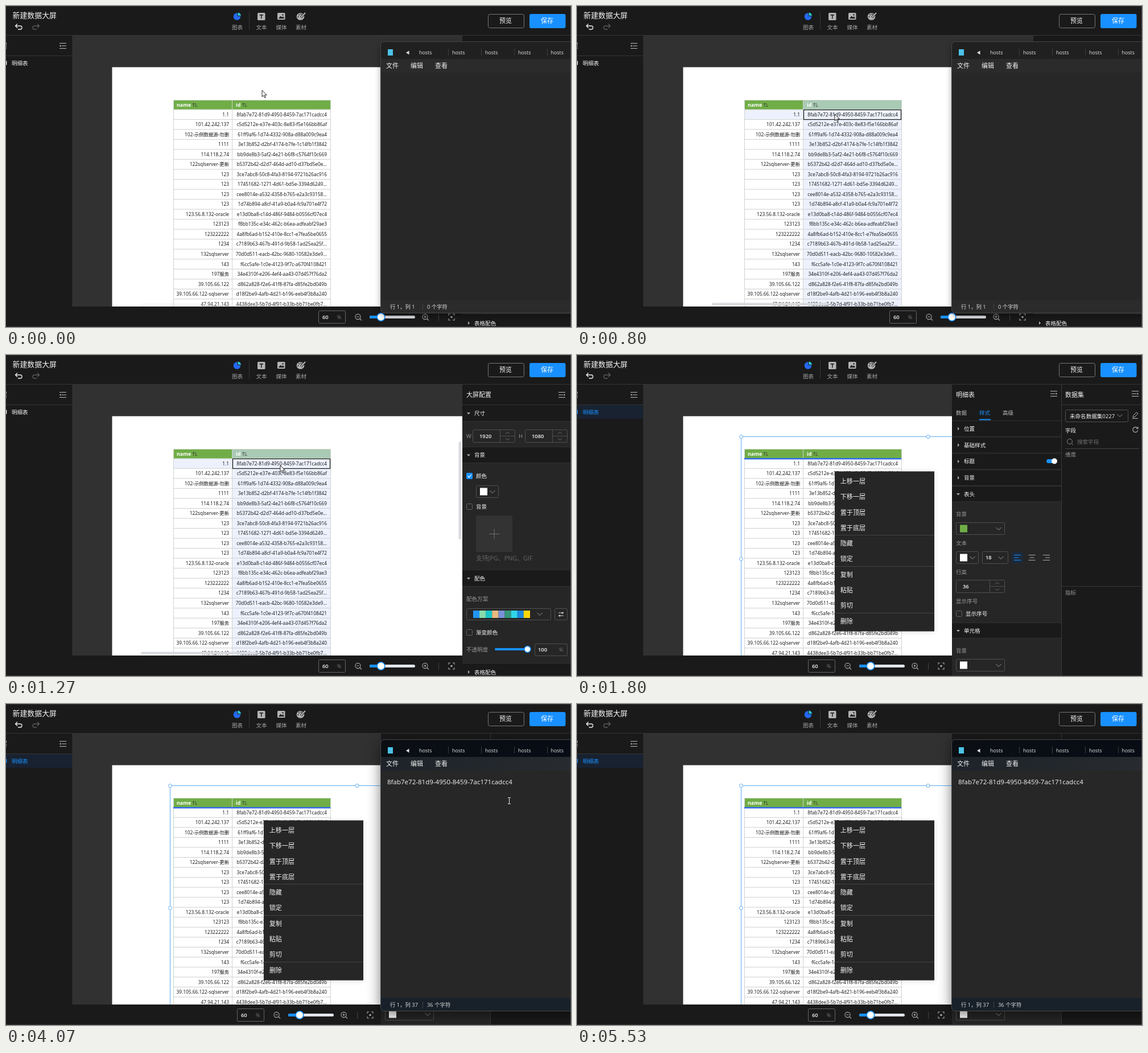
An HTML page for the animation above (5590 ms loop, 993x564 px).

```html
<!DOCTYPE html>
<html lang="zh-CN">
<head>
<meta charset="utf-8">
<title>数据大屏</title>
<style>
html, body { margin: 0; width: 100%; height: 100%; overflow: hidden; background: #1a1a1a; }
svg { display: block; width: 993px; height: 564px; }
text { font-family: 'Open Sans', 'Noto Sans CJK SC', 'Noto Sans CJK', sans-serif; white-space: pre; }
</style>
</head>
<body>
<svg id="stage" viewBox="0 0 993 564"></svg>
<script>
const LOOP = 5590, TICK = 200 / 3;
const BLUE = '#1890ff', PANEL = '#1a1a1a', BODY = '#262626', LINE = '#353535';
const WHITE = '#f5f5f5', GRAY = '#999', EDGE = '#505050', GREEN = '#70ad47';
const ID = '8fab7e72-81d9-4950-8459-7ac171cadcc4';
const MEDIUM = 'font-weight="500"', SEMI = 'font-weight="600"';

const rect = (x, y, w, h, fill, extra = '') =>
  `<rect x="${x}" y="${y}" width="${w}" height="${h}" fill="${fill}" ${extra}/>`;
const box = (x, y, w, h, stroke = EDGE, r = 2, fill = 'none') =>
  rect(x + .5, y + .5, w - 1, h - 1, fill, `stroke="${stroke}" rx="${r}"`);
const text = (x, y, str, size = 9.56, fill = WHITE, extra = MEDIUM) =>
  `<text x="${x}" y="${y + size * .37}" font-size="${size}" fill="${fill}" ${extra}>${str}</text>`;
const path = (d, stroke = '#bbb', width = 1, fill = 'none') =>
  `<path d="${d}" stroke="${stroke}" stroke-width="${width}" fill="${fill}"/>`;
const circle = (x, y, r, fill, extra = '') =>
  `<circle cx="${x}" cy="${y}" r="${r}" fill="${fill}" ${extra}/>`;
const group = (id, body, extra = '') => `<g id="${id}" ${extra}>${body}</g>`;
const hline = (x, y, w, fill = LINE) => rect(x, y, w, 1, fill);

const chevron = (x, y) => path(`M${x - 4.5} ${y - 2}l4.5 4.5 4.5-4.5`, '#999');
const foldIcon = (x, y, side) =>
  path(`M${x - 6} ${y - 4.5}h12M${side < 0 ? x - 2 : x - 6} ${y}h8M${x - 6} ${y + 4.5}h12`, '#bbb', 1.2) +
  path(`M${x + side * 6} ${y}l${-side * 2.5}-2v4z`, 'none', 0, '#bbb');
const section = (x, y, w, h, label, open) => {
  const c = y + h / 2, tx = x + 11;
  return rect(x, y, w, h, PANEL) + hline(x, y, w, '#303030') + hline(x, y + h - 1, w, '#303030') +
    path(open ? `M${tx - 3} ${c - 1}h6l-3 3.5z` : `M${tx - 1} ${c - 3}v6l3-3z`, 'none', 0, '#aaa') +
    text(x + 21, c, label);
};
const checkbox = (x, y, on) => on
  ? rect(x, y, 11, 11, BLUE, 'rx="1.5"') + path(`M${x + 2.5} ${y + 5.5}l2.3 2.5 4-5`, '#fff', 1.2)
  : box(x, y, 11, 11, '#666');
const stepper = (x, y, w, label, div) =>
  box(x, y, w, 23) + rect(x + div, y, 1, 23, EDGE) + hline(x + div, y + 11, w - div, EDGE) +
  path(`M${(x + div + x + w) / 2 - 3.5} ${y + 7.5}l3.5-3 3.5 3m-7 8l3.5 3 3.5-3`, '#777', .9) +
  text(x + 12, y + 11.5, label, 9.4, WHITE, SEMI);
const colorSelect = (x, y, w, color) =>
  box(x, y, w, 22) + rect(x + 7, y + 4.5, 13, 13, color) + chevron(x + w - 11, y + 11);

function chrome() {
  const undo = (x, dir, c) =>
    path(`M${x - 2 * dir} 31.5l${-3.5 * dir} 3.5 ${3.5 * dir} 3.5M${x - 5 * dir} 35h${8 * dir}` +
      `a3 3 0 0 ${dir > 0 ? 1 : 0} 0 6h${-4 * dir}`, c, 1.3);
  const tool = (x, label) => text(x, 37, label, 9.56, '#a6a6a6', 'text-anchor="middle"');
  return rect(0, 0, 993, 564, PANEL) + rect(116, 52, 877, 476, '#313131') + hline(0, 0, 993, '#303030') +
    hline(0, 51, 993, LINE) + text(11.6, 16.5, '新建数据大屏', 12.9) + undo(22, 1, '#eee') + undo(53, -1, '#5a5a5a') +
    circle(406, 18.5, 6.3, '#2468f2') + path('M407 17.5v-6.5a6.5 6.5 0 0 1 6.5 6.5z', PANEL, 1, '#2cc8d0') +
    rect(427, 10, 1, 32, LINE) +
    rect(442, 12, 13.5, 13, '#b4b4b4', 'rx="1.5"') + path('M445.5 15.8h6.6M448.8 15.8v6.5', PANEL, 1.5) +
    rect(477, 12, 13.5, 12, '#b4b4b4', 'rx="1.5"') + path('M479 22l3.5-4.5 2.5 2.5 2-2 2 4z', 'none', 0, PANEL) +
    circle(486.5, 15.5, 1.2, PANEL) +
    '<ellipse cx="517.5" cy="18.5" rx="6.8" ry="6.3" fill="#b4b4b4"/>' +
    [[513.5, 19], [515, 15.5], [518.5, 14.5]].map(p => circle(...p, 1.1, PANEL)).join('') +
    path('M526 12l-8 8.500', PANEL, 4) + path('M526 12l-8 8.500', '#b4b4b4', 2) +
    tool(406.5, '图表') + tool(449, '文本') + tool(484, '媒体') + tool(518.5, '素材') +
    box(847, 14, 64, 25, '#777', 3) + text(878, 26, '预览', 11, WHITE, MEDIUM + ' text-anchor="middle"') +
    rect(920, 14, 63.5, 25, BLUE, 'rx="3"') + text(951, 26, '保存', 11, '#fff', MEDIUM + ' text-anchor="middle"') +
    text(2, 70, '图层', 11, WHITE, MEDIUM + ' text-anchor="end"') + foldIcon(100, 70, -1) +
    hline(0, 87, 116) + rect(116, 52, 1, 512, '#2a2a2a') + rect(186.5, 107.5, 615.5, 421, '#fff');
}

const NAMES = ['1.1', '101.42.242.137', '102-示例数据源-勿删', '1111', '114.118.2.74', '122sqlserver-更新', '123', '123',
  '123', '123', '123.56.8.132-oracle', '123123', '123222222', '1234', '132sqlserver', '143', '197服务',
  '39.105.66.122', '39.105.66.122-sqlserver', '47.94.21.143'];
const IDS = [ID, 'c5d5212e-e37e-403c-8e83-f5e166bb86af', '61ff9af6-1d74-4332-908a-d88a009c9ea4',
  '3e13b852-d2bf-4174-b7fe-1c14fb1f3842', 'bb9de8b3-5af2-4e21-b6f8-c5764f10c669', 'b5372b42-d2d7-464d-ad10-d37bd5e0e...',
  '3ce7abc8-50c8-4fa3-8194-9721b26ac916', '17451682-1271-4d61-bd5e-3394d6249...', 'cee8014e-a532-4358-b765-e2a3c93158...',
  '1d74b894-a8cf-41a9-b0a4-fc9a701e4f72', 'e13d0ba8-c14d-486f-9484-b0556cf07ec4', 'f8bb135c-e34c-462c-b6ea-adfeabf29ae3',
  '4a8fb6ad-b152-410e-8cc1-e7fea5be0655', 'c7189b63-467b-491d-9b58-1ad25ea25f...', '70d0d511-eacb-42bc-9680-10582e3de9...',
  'f6cc5afe-1c0e-4123-9f7c-a670f4108421', '34e4310f-e206-4ef4-aa43-07d457f76da2', 'd862a828-f2e6-41f8-87fa-d85fe2bd049b',
  'd18f2be9-4afb-4d21-b196-eeb4f3b8a240', '4438dee3-5b7d-4f91-b33b-bb71be0fb7...'];

function table() {
  const rowH = 17.53, top = 182;
  const right = (x, y, str) => text(x, y, str, 8.36, '#111', 'text-anchor="end"');
  const sortIcon = x => path(`M${x + 1.5} 171v6M${x} 172.5l1.500-2 1.500 2M${x + 4} 171.5h2M${x + 4} 174h3M${x + 4} 176.500h4`, '#333', .8);
  const head = (x, label) => text(x, 173.5, label, 8.9, '#fff', 'font-weight="700"');
  let cells = '';
  NAMES.forEach((name, i) => {
    const y = top + i * rowH;
    cells += hline(294, y + rowH - .7, 277, '#cfcfcf') + right(392, y + 8.5, name) + right(564, y + 8.5, IDS[i]);
  });
  return rect(294, 165, 277, 17, GREEN) +
    group('hover', rect(398, 165, 173, 17, '#a9cab4') + rect(398, 182, 173, 346, '#edf1fd') + rect(294, 182, 104, 17, '#edf1fd')) +
    hline(294, 165, 277, '#cfd8c9') + hline(294, 181.5, 277, '#cfd8c9') +
    [294, 397, 570].map(x => rect(x, 165, 1, 363, '#cfd3cf')).join('') + cells +
    head(300, 'name') + sortIcon(328) + head(404, 'id') + sortIcon(415.5) +
    group('cellBorder', rect(398.5, 182.5, 171, 17, 'none', 'stroke="#1a1a1a" stroke-width="1.2"'));
}

const zoomBar = x => {
  const lens = (cx, plus) => circle(cx, 546, 4.6, 'none', 'stroke="#aaa" stroke-width="1.100"') +
    path(`M${cx + 3.5} 549.5l3 3M${cx - 2.2} 546h4.4${plus ? `M${cx} 543.8v4.400` : ''}`, '#aaa', 1.1);
  const f = x + 234;
  return box(x, 535, 48, 23, '#666') + text(x + 7, 546.5, '60', 9.4, WHITE, SEMI) + text(x + 33, 546.5, '%', 9, '#777') +
    lens(x + 69.5) + rect(x + 90, 544, 80, 5, '#e2e5ea', 'rx="2.500"') + rect(x + 90, 544, 20, 5, BLUE, 'rx="2.500"') +
    circle(x + 110, 546.5, 6.8, '#fff', `stroke="${BLUE}" stroke-width="1.600"`) + lens(x + 187.5, true) +
    rect(x + 211, 541, 1, 12, '#444') + circle(f, 546.5, 1.8, '#aaa') +
    path(`M${f - 5} 544v-3h3m4 0h3v3m0 5v3h-3m-4 0h-3v-3`, '#aaa', 1.1);
};

function screenConfig() {
  const swatches = ['#2196f3', '#86dcae', '#17c5c9', '#e8ba80', '#7b90d6', '#35987a', '#2fd5ea', '#1f88e0', '#ffd60a'];
  return rect(795.5, 152, 4.5, 172, '#d9dbdf', 'rx="2.200"') + zoomBar(549) +
    rect(802, 52, 191, 512, BODY) + rect(802, 52, 191, 36, PANEL) + text(809, 70, '大屏配置', 11) + foldIcon(977, 70, 1) +
    section(802, 87, 191, 30, '尺寸', true) +
    text(809, 142, 'W', 9.56, GRAY) + stepper(820, 131, 75, '1920', 48) +
    text(901, 142, 'H', 9.56, GRAY) + stepper(912, 131, 75, '1080', 48) +
    section(802, 161, 191, 29, '背景', true) + checkbox(809, 207, true) + text(826, 212.5, '颜色') +
    colorSelect(826, 229, 40, '#fff') + checkbox(809, 261) + text(826, 266.5, '背景') +
    rect(826, 282, 64, 64, '#333', 'rx="2"') + path('M849 314.5h18M858 305.5v18', '#707070') +
    text(826, 357, '支持JPG、PNG、GIF', 10.8, '#666') +
    section(802, 377, 191, 30, '配色', true) + text(809, 428, '配色方案', 9.56, GRAY) +
    box(809, 445, 149, 21) + swatches.map((c, i) => rect(821 + i * 11.1, 449, 11.2, 13, c)).join('') + chevron(938, 455) +
    box(964, 445, 23, 21) + path('M971 453h9M971 458h9', '#ccc') + circle(978, 453, 1.6, '#ccc') + circle(973, 458, 1.6, '#ccc') +
    checkbox(809, 482) + text(826, 487.5, '渐变颜色') + text(809, 517, '不透明度', 9.56, GRAY) +
    rect(859, 515, 58, 4, BLUE, 'rx="2"') + circle(916.5, 517, 5.5, '#fff', `stroke="${BLUE}" stroke-width="1.500"`) +
    box(929, 507, 58, 22) + text(935, 518, '100', 9.4, WHITE, SEMI) + text(972, 518, '%', 9, '#777') +
    section(802, 541, 191, 32, '表格配色');
}

function tableConfig() {
  const handle = (x, y) => circle(x, y, 3, '#fff', 'stroke="#5fabf2"');
  const align = (x, indent, c) => path(`M${x - 6} 351.500h12M${x - 6 + indent} 356h8M${x - 6} 360.500h12`, c, 1.2);
  const label = (x, y, str) => text(x, y, str, 9.56, GRAY);
  return rect(0, 88, 116, 24, '#182231') + path('M288.500 528V143.500H659', '#5fabf2') +
    handle(288.5, 143.5) + handle(617, 143.5) + handle(288.5, 358.5) + rect(294, 181, 276, 2.5, '#2f6be6') +
    rect(659, 52, 334, 512, PANEL) + zoomBar(406) +
    text(666, 70, '明细表', 11) + foldIcon(838, 68, 1) + text(666, 101, '数据', 9.56, '#bbb') +
    text(707, 101, '样式', 9.56, BLUE) + text(748, 101, '高级', 9.56, '#bbb') + rect(707, 112.5, 20, 2, BLUE) +
    ['位置', '基础样式', '标题', '背景'].map((s, i) => section(659, 115 + i * 28.75, 192, 28.75, s)).join('') +
    rect(825, 183, 18, 7, BLUE, 'rx="3.500"') + circle(839, 186.5, 5, '#fff') +
    section(659, 230, 192, 28, '表头', true) + rect(659, 258, 192, 212, BODY) +
    label(666, 279, '背景') + colorSelect(666, 294, 86, GREEN) + label(666, 330, '文本') +
    colorSelect(666, 345, 40, '#fff') + box(712, 345, 46, 22) + text(718, 356, '18', 9.4, WHITE, SEMI) + chevron(745, 356) +
    rect(764, 346, 20, 20, '#1b2a3c', 'rx="2"') + align(774, 0, BLUE) + align(799.5, 2, '#aaa') + align(825, 4, '#aaa') +
    label(666, 381, '行高') + stepper(666, 395, 86, '36', 59) + label(666, 432, '显示序号') +
    checkbox(666, 449) + text(683, 454.5, '显示序号') +
    section(659, 470, 192, 28, '单元格', true) + rect(659, 498, 192, 66, BODY) +
    label(666, 519, '背景') + colorSelect(666, 534, 86, '#fff') +
    rect(851, 52, 1, 512, '#3a3a3a') + text(858, 70, '数据集', 11) + foldIcon(981, 68, 1) + hline(852, 87, 141) +
    box(858, 96, 111, 22) + text(866, 107, '未命名数据集0227') + chevron(954, 106) +
    path('M977 109.500l.5-3 6-6 2.500 2.500-6 6zM976 111.500h10', '#bbb') + text(858, 132.5, '字段') +
    path('M985 128.500a4.500 4.500 0 1 0 .8 3.500M986 126v3.200h-3.200', '#bbb', 1.1) +
    circle(866, 152, 4.5, 'none', 'stroke="#888"') + path('M869.500 155.500l2.500 2.500', '#888') +
    text(879, 152, '搜索字段', 9.56, '#6e6e6e') + hline(858, 164, 130, '#444') + label(858, 174.5, '维度') +
    hline(852, 406, 141) + label(858, 417, '指标') +
    group('spinner', circle(938.5, 178.5, 5, 'none', `stroke="${BLUE}" stroke-width="1.300" stroke-dasharray="22 10"`));
}

function contextMenu() {
  const items = ['上移一层', '下移一层', '置于顶层', '置于底层', '隐藏', '锁定', '复制', '粘贴', '剪切', '删除'];
  return rect(453, 204.5, 175, 281, '#262626', 'style="filter:drop-shadow(0 1px 4px #0002)"') +
    items.map((s, i) => text(462.7, 222 + i * 27.27, s, 11.1)).join('') +
    [316, 371, 453].map(y => hline(453, y, 175, '#444')).join('');
}

function notepad() {
  const shadow = (blur, opacity) =>
    rect(659, 67, 400, 477, '#000', `rx="7" opacity="${opacity}" style="filter:blur(${blur}px)"`);
  const skin = (id, title, menu, status) => group(id,
    path('M659 94V69a6 6 0 0 1 6-6H993V94z', 'none', 0, title) + rect(659, 93, 334, 24, menu) +
    path('M659 517H993V540H665a6 6 0 0 1-6-6z', 'none', 0, status));
  const tabs = [726, 784, 842, 900, 957.5].map(x => text(x, 81.5, 'hosts', 8.9, '#e4e4e4', '')).join('');
  return group('idleShadow', shadow(6, .4)) + group('activeShadow', shadow(12, .55)) +
    rect(659, 63, 350, 477, '#272727', 'rx="6"') +
    skin('idleSkin', '#202020', '#2b2b2b', '#2b2b2b') + skin('activeSkin', 'url(#mica)', 'url(#micaMenu)', '#18212a') +
    rect(658.5, 62.5, 350, 477, 'none', 'rx="6" stroke="#484848"') +
    rect(671, 76, 9, 11, '#4cc2e8') + path('M708.500 78.500v7l-5.500-3.500z', 'none', 0, '#ddd') + tabs +
    [777, 835, 893, 951].map(x => rect(x, 75, 1, 12, '#3c3c3c')).join('') +
    text(668, 105, '文件', 11) + text(711, 105, '编辑', 11) + text(754, 105, '查看', 11) +
    group('pasted', text(670, 137, ID, 11.56, WHITE, '')) +
    `<text id="position" x="675" y="532" font-size="9.4" fill="#ddd"></text>` + rect(732, 523, 1, 11, '#444') +
    `<text id="count" x="740" y="532" font-size="9.4" fill="#ddd"></text>` + rect(0, 129, 1, 15, '#fff', 'id="caret"');
}

const gradient = (id, a, b) =>
  `<linearGradient id="${id}"><stop stop-color="${a}"/><stop offset="1" stop-color="${b}"/></linearGradient>`;
const stage = document.getElementById('stage');
stage.innerHTML =
  `<defs>${gradient('mica', '#0b0f14', '#070c15')}${gradient('micaMenu', '#1d2329', '#282b2f')}</defs>` +
  chrome() + table() +
  group('scrollbar', rect(237, 521.5, 205, 4.5, '#d9dbdf', 'rx="2.200"')) +
  rect(116, 528, 877, 36, PANEL) +
  group('screenConfig', screenConfig()) + group('tableConfig', tableConfig()) +
  group('layer', text(10, 100, '明细表', 9.56, 'currentColor') + rect(0, 96.5, 1.3, 7, 'currentColor')) +
  group('menu', contextMenu()) + group('notepad', notepad()) +
  hline(0, 563, 993, '#38343a') + rect(992, 0, 1, 564, '#484848') +
  group('arrow', path('M0 0v11.500l2.700-2.500 1.900 4.200 1.800-.8-1.900-4.100h3.700z', '#111', .9, '#fff')) +
  group('beam', path('M-2.500-5.500h2l.5.500.5-.500h2M-2.500 5.500h2l.5-.500.5.500h2M0-5v10', '#eee'));

const part = {};
stage.querySelectorAll('[id]').forEach(el => part[el.id] = el);
const show = (id, on) => { part[id].style.display = on ? '' : 'none'; };

// Pointer stretches: [time, x, y] stops, hidden outside each stretch.
const TRAILS = [
  [[0, 450, 148], [200, 449, 158], [400, 452, 178], [600, 455, 195], [670, 455, 194], [800, 453, 190],
    [929, 453, 190], [933, 391, 548], [1065, 391, 548], [1070, 450, 330], [1133, 500, 215], [1200, 512, 183],
    [1333, 453, 204], [1467, 468, 385], [1600, 420, 560]],
  [[2200, 391, 548], [2333, 640, 330], [2467, 893, 173], [2600, 888, 177], [4060, 888, 177],
    [4066, 884, 170], [4260, 884, 170], [4333, 800, 97], [4470, 500, 240], [4600, 193, 500], [4666, 193, 500]]
];
function pointerAt(t) {
  const trail = TRAILS.find(s => t >= s[0][0] && t < s[s.length - 1][0]);
  if (!trail) return null;
  const i = trail.findIndex(p => p[0] > t), [t0, x0, y0] = trail[i - 1], [t1, x1, y1] = trail[i];
  const k = (t - t0) / (t1 - t0);
  return [x0 + (x1 - x0) * k, y0 + (y1 - y0) * k];
}

function draw(ms) {
  const t = Math.floor((ms + 3.4) / TICK) * TICK + .1;
  const between = (a, b) => t >= a - 4 && t < b - 4;
  const selected = t > 1330, pasted = t > 3529, active = t > 2130;

  show('hover', between(400, 1330));
  show('cellBorder', between(400, 1330));
  show('scrollbar', !selected);
  part.scrollbar.style.opacity = Math.min(1, .15 + t / 340);
  show('screenConfig', !selected);
  show('tableConfig', selected);
  part.layer.style.color = selected ? BLUE : WHITE;
  show('menu', selected);
  show('spinner', t < 1796);
  part.spinner.setAttribute('transform', `rotate(${t * .8} 938.5 178.5)`);

  show('notepad', t < 930 || active);
  const opening = active ? Math.min(1, (t - 2060) / 200) : 1;
  part.notepad.style.opacity = opening;
  part.notepad.setAttribute('transform', `translate(0 ${(1 - opening) * 14})`);
  ['Skin', 'Shadow'].forEach(name => {
    show('idle' + name, !active);
    show('active' + name, active);
  });
  show('pasted', pasted);
  part.position.textContent = pasted ? '行 1，列 37' : '行 1，列 1';
  part.count.textContent = pasted ? '36 个字符' : '0 个字符';
  show('caret', between(2200, 2730) || between(3270, 4070) || between(4600, 5130));
  part.caret.setAttribute('x', pasted ? 890 : 670);

  const p = pointerAt(t);
  const overText = p && active && p[0] > 659 && p[1] > 117;
  show('arrow', p && !overText);
  show('beam', overText);
  if (p) part[overText ? 'beam' : 'arrow'].setAttribute('transform',
    `translate(${Math.round(p[0]) + (overText ? .5 : 0)} ${Math.round(p[1])})`);
}

const start = performance.now();
(function frame() {
  draw((performance.now() - start) % LOOP);
  requestAnimationFrame(frame);
})();
</script>
</body>
</html>
```
